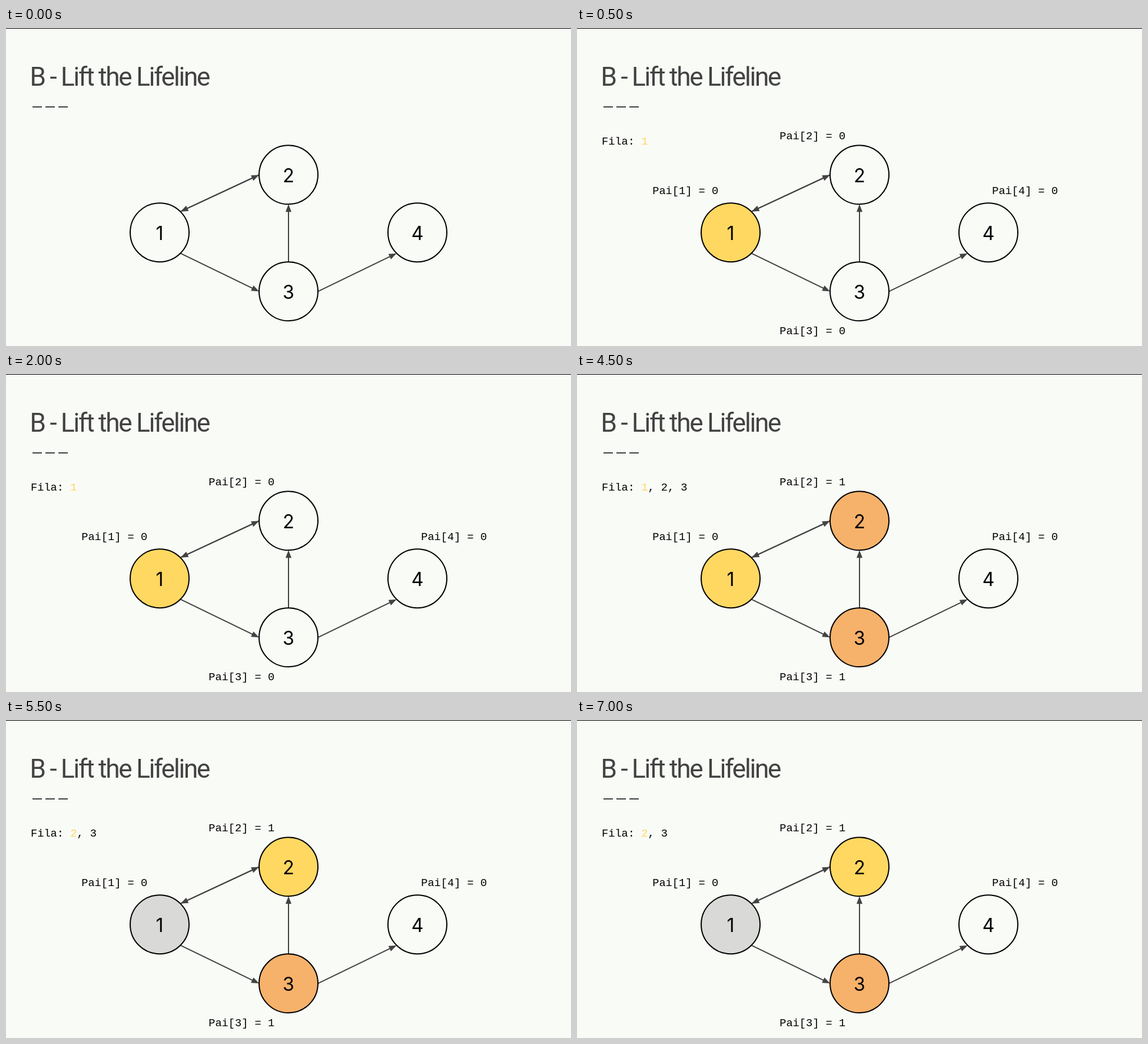
Recreate the animation shown at these times as an HTML page. Size 960 by 540 pixels, loop 8 s.

```html
<!DOCTYPE html>
<html lang="en">
<head>
<meta charset="utf-8">
<title>Breadth-first search</title>
<style>
  html, body { margin: 0; width: 100%; height: 100%; overflow: hidden; background: #f9fbf7; }
  svg { display: block; width: 100vw; height: 100vh; }
  .title { font: 400 44px Roboto, sans-serif; letter-spacing: -2.2px; fill: #424242; }
  .mono { font: 18.67px "Liberation Mono", monospace; white-space: pre; }
  .num { font: 32px Inter, sans-serif; text-anchor: middle; }
</style>
</head>
<body>
<svg id="stage" viewBox="0 0 960 540">
  <rect width="960" height="540" fill="#f9fbf7"/>
  <rect width="960" height="1" fill="#000"/>
  <text class="title" x="40.5" y="98">B - Lift the Lifeline</text>
  <path d="M45 134h16m6 0h16m6 0h16" stroke="#424242" stroke-width="2"/>
</svg>
<script>
const NS = 'http://www.w3.org/2000/svg';
const stage = document.getElementById('stage');
const INK = '#434343', YELLOW = '#ffd861', ORANGE = '#f6b26b', GRAY = '#d9dad7', NONE = 'none';
const LOOP = 8000;

const nodes = [
  { x: 261, y: 347.2, label: [128.2, 282] },
  { x: 480, y: 249.3, label: [344.2, 189] },
  { x: 480, y: 447.3, label: [344.2, 520] },
  { x: 699, y: 347.2, label: [705.2, 282] }
];

// Each step: start time, node fills, parents (null hides labels), queue
const steps = [
  { at: 0, fills: [NONE, NONE, NONE, NONE], parents: null, queue: [] },
  { at: 500, fills: [YELLOW, NONE, NONE, NONE], parents: [0, 0, 0, 0], queue: [1] },
  { at: 3000, fills: [YELLOW, ORANGE, ORANGE, NONE], parents: [0, 1, 1, 0], queue: [1, 2, 3] },
  { at: 5500, fills: [GRAY, YELLOW, ORANGE, NONE], parents: [0, 1, 1, 0], queue: [2, 3] }
];

function add(tag, attrs, parent = stage) {
  const el = document.createElementNS(NS, tag);
  for (const k in attrs) el.setAttribute(k, attrs[k]);
  return parent.appendChild(el);
}

function arrow(x1, y1, x2, y2) {
  const len = Math.hypot(x2 - x1, y2 - y1);
  const angle = Math.atan2(y2 - y1, x2 - x1) * 180 / Math.PI;
  const g = add('g', { transform: `translate(${x1} ${y1}) rotate(${angle})` });
  add('path', { d: `M0 0H${len - 12}`, stroke: INK, 'stroke-width': 2 }, g);
  add('path', { d: `M${len} 0l-13 -5v10z`, fill: INK }, g);
}

arrow(296.5, 311.7, 430, 249.4);
arrow(430, 249.4, 296.5, 311.7);
arrow(296.5, 382.7, 430, 447.3);
arrow(480, 397.3, 480, 299.3);
arrow(530, 447.3, 663.6, 382.7);

nodes.forEach((n, i) => {
  n.disc = add('circle', { cx: n.x, cy: n.y, r: 50, stroke: '#000', 'stroke-width': 2 });
  add('text', { class: 'num', x: n.x, y: n.y + 12.3 }).textContent = i + 1;
  n.text = add('text', { class: 'mono', x: n.label[0], y: n.label[1] });
});

const queue = add('text', { class: 'mono', x: 42, y: 198 });
const [name, head, tail] = ['#000', YELLOW, '#000'].map(fill => add('tspan', { fill }, queue));

let shown = null;
function draw(t) {
  const step = steps.filter(s => s.at <= t).pop();
  if (step === shown) return;
  shown = step;
  const { fills, parents, queue: items } = step;
  nodes.forEach((n, i) => {
    n.disc.setAttribute('fill', fills[i]);
    n.text.textContent = parents ? `Pai[${i + 1}] = ${parents[i]}` : '';
  });
  name.textContent = items.length ? 'Fila: ' : '';
  head.textContent = items.length ? items[0] : '';
  tail.textContent = items.slice(1).map(v => ', ' + v).join('');
}

const start = performance.now();
function tick() {
  draw((performance.now() - start) % LOOP);
  requestAnimationFrame(tick);
}
draw(0);
requestAnimationFrame(tick);
</script>
</body>
</html>
```
